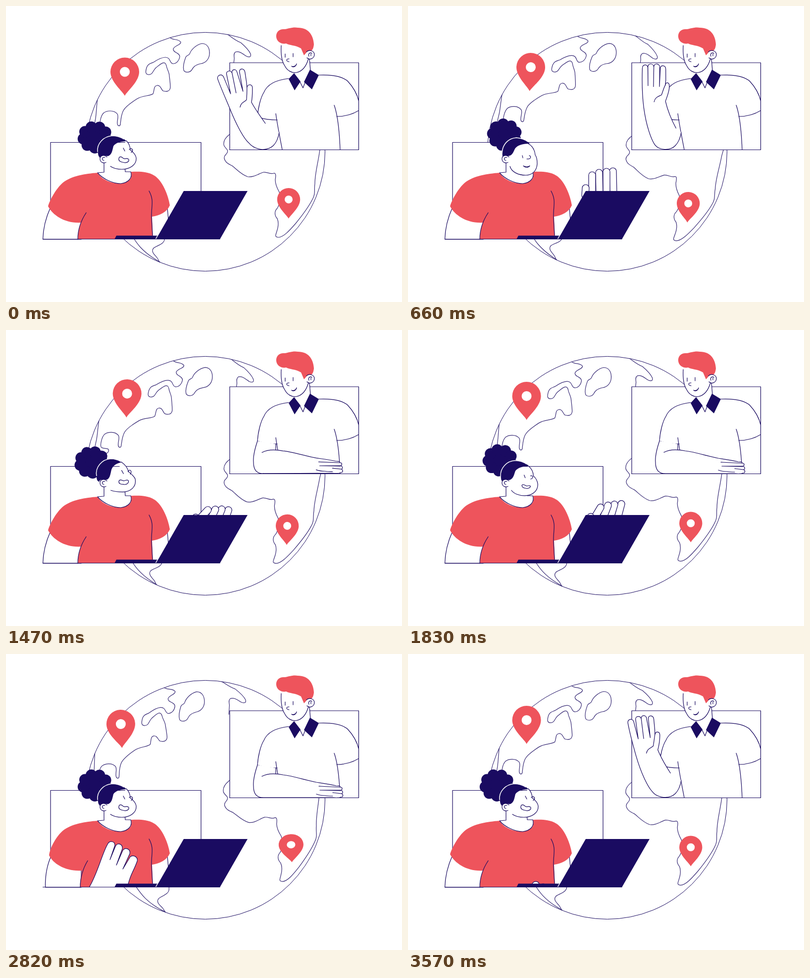
Recreate the animation shown at these times as an HTML page. Size 800x600 px, loop 3600 ms.

```html
<!DOCTYPE html>
<html lang="en">
<head>
<meta charset="utf-8">
<title>Video call around the globe</title>
<style>
html,body{margin:0;width:100%;height:100%;overflow:hidden;background:#fff}
svg{display:block;width:800px;height:600px}
.l{fill:none;stroke:#1a0b61;stroke-width:1.2;stroke-linejoin:round;stroke-linecap:round}
.thin{stroke-width:1}
.w{fill:#fff}
.n{fill:#1a0b61}
.r{fill:#ee545c}
.soft{opacity:.86}
</style>
</head>
<body>
<svg viewBox="0 0 800 600" xmlns="http://www.w3.org/2000/svg">
<defs>
  <clipPath id="ball"><circle cx="402.5" cy="295.5" r="242"/></clipPath>
  <clipPath id="frame"><rect x="452" y="0" width="260.5" height="291.5"/></clipPath>
  <clipPath id="desk"><rect x="60" y="200" width="440" height="273"/></clipPath>
  <g id="pin">
    <path class="r" d="M0 0C-4 -9 -29 -28 -29 -48.5A29 29 0 1 1 29 -48.5C29 -28 4 -9 0 0Z"/>
    <circle class="w" cy="-48.5" r="10"/>
  </g>
</defs>

<circle class="l thin" cx="402.5" cy="295.5" r="242"/>
<g clip-path="url(#ball)">
  <g id="land" class="l soft">
    <path d="M371 97C374 88 385 78 396 76C407 76 412 86 411 98C410 108 403 116 393 117C380 120 378 125 375 130C370 136 361 135 359 130C357 122 360 112 363 104C365 99 369 101 371 97Z"/>
    <path d="M328 56L331 64C338 70 348 66 353 73C354 79 340 80 338 87C337 95 351 94 351 103C350 110 345 117 337 117C330 116 333 104 322 104C313 104 304 110 298 114C291 117 287 117 284 125C282 132 281 138 287 139C297 140 296 131 303 125C312 118 321 109 324 121C325 128 330 134 330 142C331 150 332 158 332 165C331 174 323 174 317 172C313 168 312 160 305 161C298 162 300 171 297 178C290 183 276 181 265 188C254 195 242 203 237 212C232 222 232 232 231 240C230 244 226 244 225 239C224 232 228 224 225 219C218 210 203 212 197 217C191 223 188 240 191 244C196 247 201 245 205 247C208 251 204 256 198 258"/>
    <path d="M186 180C182 205 183 220 180 233C178 242 177 250 178 258"/>
    <path d="M440 50L447 57C457 64 465 71 474 74C481 80 490 88 494 97C496 104 491 104 486 102C478 97 472 91 464 93C458 97 462 104 461 108L459 125"/>
    <path d="M470 245L452 260C444 266 439 273 440 281C441 288 450 290 447 297C445 302 440 302 441 309C443 317 449 320 457 324C465 330 474 341 488 346C500 348 510 340 520 337C528 336 534 342 541 339C546 338 545 346 544 352C544 362 548 370 552 377C556 390 552 404 548 410C542 416 542 424 548 431C551 438 550 448 547 457C545 464 542 468 550 469C560 469 572 456 585 441C598 425 612 406 619 392C626 380 622 372 624 360C624 340 630 320 634 292L638 275"/>
    <path d="M250 458C262 478 272 497 311 519"/>
    <path d="M321 460L320 474C318 484 303 486 298 491C292 498 301 505 305 510C308 514 309 517 312 523"/>
  </g>
</g>
<use id="pinA" href="#pin"/>
<use id="pinB" href="#pin"/>

<rect class="l w" x="452" y="115" width="260.5" height="176.5"/>
<g class="l" clip-path="url(#frame)">
  <path d="M571 147C545 150 528 158 521 175C514 186 509 208 508 225C520 229 535 231 548 231"/>
  <path d="M545 218C548 240 553 265 558 291"/>
  <path d="M632 140C655 139 677 141 690 152C705 168 711 185 713 194M714 211C700 220 684 224 668 224"/>
  <path d="M663 201C668 215 673 240 675 291"/>
</g>
<g id="guy">
  <path class="w" d="M582 130L613 105L615 132L600 166Z"/>
  <path class="l" d="M613 106L615 131M593 152L600 166L605 153"/>
  <path class="n" d="M582 136L595 153L583 171L571 148ZM614 129L632 140L618 169L602 154Z"/>
  <path class="l w" d="M556 80C555 98 557 112 563 121C568 131 577 136 586 135C598 133 606 124 611 107L608 80"/>
  <path class="r" d="M563 47C551 46 545 54 546 63C547 72 556 78 566 76C572 80 585 79 596 86L602 100L609 92C617 94 621 88 622 78C621 58 610 44 590 44C580 42 570 46 563 47Z"/>
  <path class="l w" d="M607 93C612 88 623 90 623 99C622 107 613 110 608 105"/>
  <path class="l" d="M612 102C610 97 614 93 618 96M616 97V101M564 97V104M580 96V103M572 107C566 107 565 112 572 113"/>
  <path id="grin" class="l w"/>
</g>
<path id="upper" class="l w" d="M508 225C503 240 499 258 500 268C500 285 508 291 519 291L545 270L545 231"/>
<path id="arm" class="l w"/>
<path id="fold" class="l"/>
<path class="l" d="M452 291.5H712.5"/>

<rect class="l w" x="90" y="276.5" width="304" height="196"/>
<path id="sideArm" class="l w"/>
<path class="l" d="M326 410L328 432"/>
<path id="top" class="r"/>
<path class="l w" d="M198 315V337L185 338C195 350 215 360 232 360C248 358 256 348 252 336L241 336L240 325"/>
<path class="l" d="M289 375C300 395 293 405 294 430L296 465"/>
<path id="crease" class="l"/>
<g id="bun" class="n"></g>
<ellipse class="w" cx="222" cy="302" rx="24" ry="24"/>
<path id="face" class="l w"/>
<path id="cap" class="n"/>
<path id="band" fill="none" stroke="#fff" stroke-width="1.5"/>
<path id="marks" class="l"/>
<path id="mouth" class="l w"/>
<path class="l w" d="M204 306C197 300 189 304 190 311C191 318 198 319 202 317"/>
<path class="l" d="M200 307C193 306 193 313 198 313"/>
<g clip-path="url(#desk)">
  <path id="palm" class="l w" d="M168 473C185 445 194 405 205 386C209 377 220 379 220 388L210 417L221 390C225 381 236 385 235 395L223 428L236 398C241 391 252 395 250 405L236 436L251 411C258 406 267 412 265 420C258 440 252 445 247 466L246 480"/>
  <g id="hand" stroke-linecap="round"></g>
</g>
<path class="n" d="M223 465.500H309L303 473H219Z"/>
<path id="lid" class="n"/>
<path d="M302.500 472L306.500 465" stroke="#fff" stroke-width="1.500"/>
<path class="l" d="M74.500 472.500H432"/>
</svg>
<script>
const LOOP = 3600, STEP = 30, CX = 402.5, CY = 295.5;
const $ = id => document.getElementById(id);
const set = (id, name, value) => $(id).setAttribute(name, value);
const draw = (id, d) => set(id, 'd', d);

const ease = x => (1 - Math.cos(Math.PI * Math.min(1, Math.max(0, x)))) / 2;
const span = (t, a, b) => ease((t - a) / (b - a));

// Eased value along [time, value] keys
function track(t, keys) {
  let i = 1;
  while (i < keys.length - 1 && t > keys[i][0]) i++;
  const [t0, a] = keys[i - 1], [t1, b] = keys[i];
  return a + (b - a) * span(t, t0, t1);
}

// Blend two paths that share a structure
function mix(a, b, k) {
  const num = /-?[\d.]+/g, to = b.match(num);
  let i = 0;
  return a.replace(num, v => (+v + (to[i++] - v) * k).toFixed(2));
}

const ARM = {
  up: 'M542 248C534 233 526 215 521 193C524 184 529 174 529 163C529 154 523 153 521 160L522 150L522 128C522 119 511 119 511 126L509 163L510 124C510 115 498 115 498 123L497 163L498 123C497 115 486 115 486 123L486 161L486 124C485 116 475 117 475 126C474 150 474 180 477 205C482 245 492 270 498 280C506 293 530 294 540 283C546 277 550 268 552 256',
  left: 'M524 238C514 224 504 210 496 195C498 186 498 176 498 166C498 157 488 158 487 165L486 154L483 134C481 125 471 126 472 134L479 173L467 134C465 126 455 128 457 136L465 176L457 136C454 129 444 131 446 139L454 178L440 144C436 136 426 140 428 148C434 165 445 190 452 207C465 240 480 268 490 277C503 293 527 295 540 283C546 277 550 268 552 256',
  chin: 'M552 258C556 244 561 225 569 212C578 206 592 197 605 189C611 182 605 176 599 181L600 176L618 153C619 145 610 144 608 149L596 168L604 143C605 135 599 133 597 137L580 172L597 136C596 129 588 129 586 136L568 170L584 131C583 124 576 123 574 130C566 145 558 165 549 176C536 192 502 225 498 260C497 290 525 295 538 284C545 277 549 268 552 258',
  rest: 'M519 291C550 291 590 291 626 291C638 291 650 291 660 291C668 292 674 291 674 291L676 290L678 290C682 289 681 283 677 283L660 281L678 283C682 282 680 276 676 276L634 276L676 277C680 275 680 270 676 270L632 268L675 270C676 267 670 267 667 267C655 264 640 262 627 260C605 256 580 247 560 245C545 242 528 242 517 248C517 248 517 248 517 248'
};
const FOLD = {
  up: 'M498 194C500 184 507 183 513 180C516 172 518 165 521 160',
  left: 'M473 205C475 195 482 195 486 190C487 180 487 172 487 165',
  chin: 'M574 200C578 194 584 188 589 186C592 184 596 183 599 181',
  rest: 'M627 284C632 286 640 287 645 287C650 288 655 288 660 288'
};
const pose = (p, w, s) => s < 1 ? mix(mix(p.up, p.left, w), p.chin, s) : mix(p.chin, p.rest, s - 1);

// Woman's head: chin high, level, low
const HEAD = {
  face: [
    'M228 265C238 271 243 278 246 285C251 290 257 293 260 299C264 316 252 327 236 327C228 327 218 326 212 325',
    'M243 273C248 278 251 285 251 292C257 296 262 302 263 308C264 322 250 331 234 331C226 331 217 329 211 325',
    'M243 279C252 284 256 292 257 302C261 307 261 314 261 320C260 335 250 343 238 343C222 343 209 336 206 325'],
  cap: [
    'M183 305C176 282 190 261 210 260C218 260 224 262 229 265C217 269 213 274 211 283C209 291 209 299 203 303C198 305 189 300 187 308Z',
    'M187 304C181 282 195 264 215 263C228 263 238 268 243 274C230 275 222 277 217 284C215 292 214 301 207 304C203 305 192 300 190 308Z',
    'M191 305C189 284 200 268 219 267C231 268 240 273 246 279C232 279 222 282 217 288C213 294 212 303 203 304C200 304 194 304 193 307Z'],
  band: [
    'M182 296C178 278 192 261 210 260C218 260 224 262 229 265',
    'M185 296C183 279 197 264 215 263C224 263 232 266 238 270',
    'M190 297C191 281 202 268 219 267C229 268 237 271 242 275'],
  marks: [
    'M232 283L236 290M245 285C248 278 254 283 250 290',
    'M237 288L240 294M249 291C253 286 259 292 253 297',
    'M231 303L232 308M245 303C249 305 249 311 240 310'],
  mouth: [
    'M228 306C229 301 234 304 237 304C241 304 245 299 247 303C248 308 243 312 237 311C231 311 228 310 228 306Z',
    'M228 309C229 304 234 305 237 309C241 311 245 307 248 311C249 316 243 319 237 317C231 316 227 314 228 309Z',
    'M233 324C235 325 237 326 240 326C242 326 245 325 246 324C246 325 242 327 240 327C237 327 235 326 233 324Z']
};
const GRIN = [
  'M577 122C580 124 586 122 587 117C586 123 580 125 577 122Z',
  'M574 119C578 121 583 119 586 115C586 124 577 125 574 119Z'];

// One segment per finger, thumb first
const FINGERS = {
  wave: 'M358 384L359 369M372 384L372 343M387 384L386 338M401 384L401 336M415 384L414 335',
  grip: 'M394 386L396 382M409 378L425 370M434 380L440 372M446 382L453 373M460 386L466 377',
  tilt: 'M364 386L369 378M373 386L389 359M392 386L404 355M407 386L417 353M422 386L431 352',
  down: 'M364 436L369 428M373 436L389 409M392 436L404 405M407 436L417 403M422 436L431 402'
};

function fingers(d) {
  return d.match(/M[^M]+/g).reverse().map(p =>
    `<path d="${p}" stroke="#1a0b61" stroke-width="15.200"/><path d="${p}" stroke="#fff" stroke-width="12.800"/>`).join('');
}

let curls = '<ellipse cx="180" cy="266" rx="28" ry="26"/>';
for (let i = 0; i < 9; i++) {
  const a = i * Math.PI * 2 / 9 + .2;
  curls += `<circle cx="${180 + 24 * Math.cos(a)}" cy="${266 + 21.5 * Math.sin(a)}" r="11.500"/>`;
}
$('bun').innerHTML = curls;

function pin(id, x, y, size, spin, lift, squash) {
  set(id, 'transform', `rotate(${spin} ${CX} ${CY}) translate(${x} ${y - lift}) scale(${size * (1 + squash)} ${size * (1 - squash)})`);
}
const hop = (t, a, b) => t > a && t < b ? Math.sin(Math.PI * (t - a) / (b - a)) : 0;

function globe(t) {
  const spin = 3 * Math.sin(t / LOOP * Math.PI * 2);
  set('land', 'transform', `rotate(${spin} ${CX} ${CY})`);
  pin('pinA', 240, 182, 1, spin, 9 * hop(t, 635, 1020), .06 * hop(t, 1020, 1110));
  pin('pinB', 571, 431, .8, spin, 9 * hop(t, 2280, 2740), .08 * hop(t, 2740, 2900));
}

function man(t) {
  const s = 2 * (span(t, 720, 1500) - span(t, 2850, 3300));
  const wave = .76 + .76 * Math.sin(t / 400 * Math.PI * 2 + .33);
  const lean = Math.sin(s * Math.PI / 2);
  draw('arm', pose(ARM, wave, s));
  draw('fold', pose(FOLD, wave, s));
  set('upper', 'visibility', s > 1 ? 'visible' : 'hidden');
  draw('grin', mix(GRIN[0], GRIN[1], lean));
  set('guy', 'transform', `translate(${2 * lean} 0)`);
}

function woman(t) {
  const nod = track(t, [[0, 0], [250, 0], [620, 1], [740, 1], [1110, -1], [1300, -1], [1830, .4], [2400, -.15], [2820, 0], [3600, 0]]);
  for (const id in HEAD) {
    const [high, level, low] = HEAD[id];
    draw(id, mix(level, nod < 0 ? high : low, Math.abs(nod)));
  }
  const roll = nod < 0 ? nod * .67 : nod;
  set('bun', 'transform', `translate(${15 * roll} ${-5 * roll}) rotate(${13 * roll} 180 266)`);

  // Raised palm in front of the chest
  const rise = span(t, 2050, 2370), g = rise - span(t, 2980, 3400);
  const away = 1 - rise + span(t, 2950, 3760);
  set('palm', 'transform', `translate(${52 * away} ${93 * away})`);
  draw('sideArm', mix('M90 408C80 430 75 450 74.5 473L152 473L152 430', 'M91 410C82 430 79 450 79.5 473L152 473L152 430', g));
  draw('crease', mix('M162 419C150 437 145 455 145 473', 'M165 419C154 437 150 455 150 473', g));

  // Far hand reaches over the lid and pulls it
  let d;
  if (t < 850) d = mix(FINGERS.down, FINGERS.wave, span(t, 260, 600));
  else if (t < 1300) d = mix(FINGERS.wave, FINGERS.grip, span(t, 850, 1090));
  else if (t < 1780) d = mix(FINGERS.grip, FINGERS.tilt, span(t, 1300, 1650));
  else d = mix(FINGERS.tilt, FINGERS.down, span(t, 1810, 2080));
  $('hand').innerHTML = fingers(d);

  const pull = 2.3 * (span(t, 960, 1100) - span(t, 1250, 1400));
  draw('lid', `M${359 + pull} ${375 + pull}H${488 + pull}L432 473H303Z`);
  const l = 2 * g, c = 4.5 * g, e = .8 * pull;
  draw('top', `M185 338C160 340 133 344 115 358C102 369 89 392 ${85 + l} ${406 + l}C95 425 120 441 ${151 + c / 2} 439C${147 + c} 450 ${145 + c} 462 ${145 + c} 473H297L295 427C310 425 325 418 ${331 + e} ${404 + e}C328 384 316 354 300 344C284 334 265 336 253 336C254 345 253 352 246 355C225 366 195 355 185 338Z`);
}

function render(ms) {
  const t = Math.floor(ms % LOOP / STEP) * STEP;
  globe(t);
  man(t);
  woman(t);
}

const start = performance.now();
function tick() {
  render(performance.now() - start);
  requestAnimationFrame(tick);
}
tick();
</script>
</body>
</html>
```
